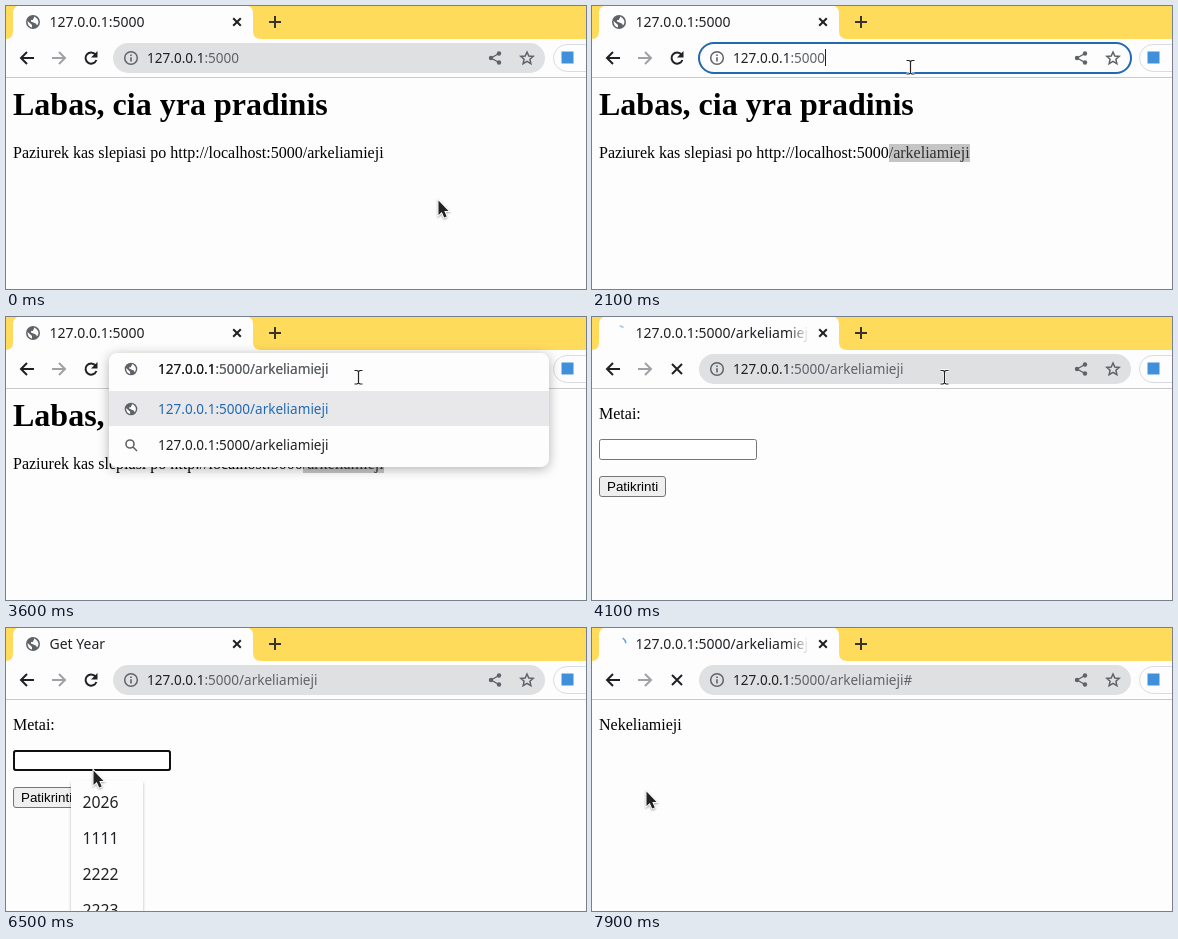
Recreate the animation shown at these times as an HTML page with a canvas. Size 580 by 283 pixels, loop 8 s.

```html
<!DOCTYPE html>
<html lang="lt">
<head>
<meta charset="utf-8">
<style>
  html, body { margin: 0; width: 100%; height: 100%; overflow: hidden; background: #fefdfe; }
  canvas { display: block; width: 580px; height: 283px; }
</style>
</head>
<body>
<canvas id="stage" width="580" height="283"></canvas>
<script>
const g = document.getElementById('stage').getContext('2d');
const LOOP = 8000, STEP = 100;
const PAPER = '#fefdfe', INK = '#202124', GREY = '#5f6368', BLUE = '#3390fa';
const UI = '"Noto Sans", "Open Sans", sans-serif';
const SERIF = '"Liberation Serif", serif';
const SANS = '"Liberation Sans", sans-serif';
const HOST = '127.0.0.1', PORT = ':5000', PATH = '/arkeliamieji';

// Pointer path: time, x, y
const pointer = [
  [0, 432, 194], [100, 432, 194], [400, 298, 164], [500, 298, 164], [900, 296, 143], [1000, 296, 143],
  [1100, 396, 160], [1200, 341, 155], [1400, 190, 62], [1500, 143, 30], [1600, 175, 10],
  [1700, 245, 24], [1900, 318, 61], [2200, 318, 61], [2400, 526, 61], [2700, 526, 61],
  [2900, 352, 60], [4600, 352, 60], [4800, 180, 160], [4900, 50, 241], [5000, 2, 235],
  [5100, 88, 198], [5200, 88, 198], [5500, 62, 144], [5600, 62, 144], [5900, 87, 136],
  [6400, 87, 136], [6500, 87, 142], [6600, 87, 142], [6700, 92, 172], [7300, 92, 172],
  [7700, 54, 163], [8000, 54, 163]
];
const beamTimes = [[700, 1100], [1900, 4700], [5700, 6500]];
const during = (t, a, b) => t >= a && t < b;

function text(s, x, y, size, family, color = '#000', weight = '') {
  g.font = `${weight} ${size}px ${family}`;
  g.fillStyle = color;
  g.fillText(s, x, y);
  return x + g.measureText(s).width;
}

function box(x, y, w, h, r, fill, stroke, width = 1) {
  g.beginPath();
  g.roundRect(x, y, w, h, r);
  if (fill) { g.fillStyle = fill; g.fill(); }
  if (stroke) { g.strokeStyle = stroke; g.lineWidth = width; g.stroke(); }
}

function shadowBox(x, y, w, h, r, blur) {
  g.save();
  g.shadowColor = 'rgba(0,0,0,.3)';
  g.shadowBlur = blur;
  g.shadowOffsetY = 2;
  box(x, y, w, h, r, PAPER);
  g.restore();
}

function stroke(d, color = INK, width = 2, x = 0, y = 0) {
  g.save();
  g.translate(x, y);
  g.strokeStyle = color;
  g.lineWidth = width;
  g.stroke(new Path2D(d));
  g.restore();
}

function fill(d, color, x = 0, y = 0) {
  g.save();
  g.translate(x, y);
  g.fillStyle = color;
  g.fill(new Path2D(d));
  g.restore();
}

function disc(x, y, r, color) {
  g.beginPath();
  g.arc(x, y, r, 0, Math.PI * 2);
  g.fillStyle = color;
  g.fill();
}

function globe(x, y, r) {
  disc(x, y, r, GREY);
  g.save();
  g.translate(x, y);
  g.scale(r / 7, r / 7);
  fill('M-5.5-1 L-1 3 V5.6 Q-5.5 4.5 -5.5-1 M1-5.5 Q5 -4 5.5 0 Q5 3 4 3.5 Q3.5 1 1.5 1 L-2-.5 V-2 H0 V-3.5 H1Z', PAPER);
  g.restore();
}

function cross(x, y, r) {
  stroke(`M${-r} ${-r} L${r} ${r} M${r} ${-r} L${-r} ${r}`, INK, 2, x, y);
}

function spinner(t) {
  const age = t < 5000 ? Math.min(t - 4000, 200) : t - 7750;
  const from = (-100 + age * .15) * Math.PI / 180;
  const sweep = (age * .3 + 5) * Math.PI / 180;
  const turn = t > 5000 ? .35 : 0;
  g.beginPath();
  g.arc(27, 16, 7, from + turn, from + turn + sweep);
  g.strokeStyle = t > 5000 ? '#62a5e4' : '#a5c5e8';
  g.lineWidth = 1.7;
  g.stroke();
}

function tabStrip(t, loading) {
  g.fillStyle = '#ffdb5c';
  g.fillRect(0, 0, 580, 33);
  fill('M0 33 Q7 33 7 25 V7 Q7 0 15 -1 H239 Q247 0 247 7 V25 Q247 33 255 33Z', PAPER);
  if (loading) spinner(t); else globe(27, 16, 7);

  const address = HOST + PORT;
  const title = loading ? address + PATH : t < 4500 ? address : 'Get Year';
  g.save();
  g.beginPath();
  g.rect(40, 0, 177, 33);
  g.clip();
  text(title, 43.5, 21, 14, UI, INK);
  const fade = g.createLinearGradient(196, 0, 217, 0);
  fade.addColorStop(0, 'rgba(254,253,254,0)');
  fade.addColorStop(1, PAPER);
  g.fillStyle = fade;
  g.fillRect(196, 3, 22, 28);
  g.restore();
  cross(231, 16, 3.8);
  stroke('M-6 0 H6 M0 -6 V6', '#38342a', 2, 269, 16);
}

function urlText(x, path, selected) {
  let end = text(HOST, x, 57, 13.55, UI, selected ? '#fff' : INK);
  return text(PORT + path, end, 57, 13.55, UI, selected ? '#fff' : GREY);
}

function toolbar(t, loading) {
  g.fillStyle = PAPER;
  g.fillRect(0, 33, 580, 38);
  g.fillStyle = '#cacacc';
  g.fillRect(0, 71, 580, 1);
  const arrow = 'M7 0 H-6 M0 -6 L-6 0 L0 6';
  stroke(arrow, INK, 2, 21, 52);
  stroke('M-7 0 H6 M0 -6 L6 0 L0 6', '#a0a1a4', 2, 53, 52);
  if (loading) cross(85, 52, 5);
  else {
    stroke('M4.5 -3.5 A5.6 5.6 0 1 0 5.4 2', INK, 2, 85, 52);
    fill('M6.5 -7 V-.5 H0Z', INK, 85, 52);
  }
  box(547.5, 38.5, 50, 27, 13.5, PAPER, '#d9dce2');
  box(555.5, 45.5, 12, 12, 0, '#3f8fda');

  const focused = during(t, 2000, 3100), editing = during(t, 3100, 4000);
  if (editing) return suggestions(t);

  if (focused) box(107, 37, 432, 30, 15, PAPER, '#2269b3', 2);
  else box(107, 37, 432, 30, 15, '#dee0e2');
  g.beginPath();
  g.arc(125, 52, 6.3, 0, Math.PI * 2);
  g.strokeStyle = GREY;
  g.lineWidth = 1.5;
  g.stroke();
  stroke('M0 -.7 V3.6 M0 -3.6 V-2', GREY, 1.6, 125, 52);

  stroke('M4 -4.5 L-4 0 L4 4.5', GREY, 1.4, 489, 52);
  for (const [x, y] of [[493, 47.5], [485, 52], [493, 56.5]]) disc(x, y, 2.2, GREY);
  stroke('M0 -6 L1.8 -2 L6.2 -1.6 L2.9 1.3 L3.9 5.6 L0 3.3 L-3.9 5.6 L-2.9 1.3 L-6.2 -1.6 L-1.8 -2Z',
    GREY, 1.5, 521, 52);

  const selected = during(t, 2000, 2100) || during(t, 2300, 2600);
  if (selected) {
    g.fillStyle = BLUE;
    g.fillRect(141, 43, 93, 18);
  }
  const path = t < 4000 ? '' : t < 7800 ? PATH : PATH + '#';
  const end = urlText(141, path, selected);
  if (focused && !selected) {
    g.fillStyle = INK;
    g.fillRect(Math.round(end), 43, 1, 17);
  }
}

function suggestions(t) {
  const open = t >= 3200;
  if (open) {
    shadowBox(103, 36, 440, 114, 8, 12);
    g.fillStyle = '#e8e8ea';
    g.fillRect(103, 74, 440, 35);
    globe(125, 92, 6.3);
    urlText(152, PATH);
    text(HOST + PORT + PATH, 152, 97, 13.55, UI, '#2269b3');
    stroke('M2 2 L6 6 M3 -1 A4 4 0 1 1 -5 -1 A4 4 0 1 1 3 -1', GREY, 1.6, 125, 128);
    text(HOST + PORT + PATH, 152, 133, 13.55, UI, INK);
  }
  globe(125, 52, 6.3);
  const end = urlText(152, PATH);
  if (t < 3600) {
    g.fillStyle = INK;
    g.fillRect(Math.round(end), 43, 1, 17);
  }
}

function homePage(t) {
  text('Labas, cia yra pradinis', 7, 109, 32, SERIF, '#000', 'bold');
  const end = text('Paziurek kas slepiasi po http://localhost:5000', 7, 152, 16, SERIF);
  if (t >= 1100) {
    g.fillStyle = t < 2000 ? BLUE : '#c5c5c5';
    g.fillRect(297, 138, 81, 18);
  }
  text(PATH, end, 152, 16, SERIF, during(t, 1100, 2000) ? '#fff' : t < 1100 ? '#000' : '#303030');
}

function formPage(t) {
  const focus = during(t, 5800, 7700), filled = t >= 6700;
  text('Metai:', 7, 102, 16, SERIF);
  box(7.5, 122.5, 157, 20, 2, filled ? '#e8f0fe' : '#fff', '#767676');
  if (focus) box(8, 123, 156, 19, 2, null, '#101010', 2);
  let end = 11;
  if (filled) end = text('2026', 11, 137, 13.33, SANS);
  if (during(t, 5800, 6500) || during(t, 7100, 7700)) {
    g.fillStyle = '#000';
    g.fillRect(Math.floor(end), 125, 1, 15);
  }
  const hover = during(t, 5400, 5500) || t >= 7500;
  box(7.5, 159.5, 66, 20, 2.5, hover ? '#e5e5e5' : '#efefef', '#767676');
  if (t >= 7700) box(7, 159, 67, 21, 3, null, '#101010', 2);
  text('Patikrinti', 15, 174, 13.33, SANS);

  if (during(t, 5900, 7100)) {
    shadowBox(65, 152, 72, 150, 3, 3);
    if (filled) {
      g.fillStyle = '#e6e6e8';
      g.fillRect(65, 156, 72, 36);
    }
    ['2026', '1111', '2222', '2223'].forEach((year, i) =>
      text(year, 76.5, 180 + 36 * i, 15.8, UI, INK));
  }
}

function drawPointer(t) {
  const i = Math.max(1, pointer.findIndex(p => p[0] >= t));
  const [t0, x0, y0] = pointer[i - 1], [t1, x1, y1] = pointer[i];
  const k = (t - t0) / (t1 - t0);
  const x = Math.round(x0 + (x1 - x0) * k), y = Math.round(y0 + (y1 - y0) * k);
  if (beamTimes.some(([a, b]) => during(t, a, b))) {
    const beam = 'M-3.5 -6.5 H-1 L.5 -5.5 L2 -6.5 H4.5 M.5 -6 V6.5 M-3.5 7 H-1 L.5 6 L2 7 H4.5';
    stroke(beam, '#fff', 3, x, y);
    stroke(beam, '#222', 1.2, x, y);
  } else {
    const arrow = 'M.5 .5 V15 L3.8 12 L6.2 17.5 L8.7 16.4 L6.3 11 H10.5Z';
    g.save();
    g.shadowColor = 'rgba(0,0,0,.35)';
    g.shadowBlur = 2;
    g.shadowOffsetY = 1;
    stroke(arrow, '#fff', 2, x, y);
    g.restore();
    fill(arrow, '#222', x, y);
  }
}

function draw(now) {
  const t = Math.floor(now % LOOP / STEP) * STEP;
  const loading = during(t, 4000, 4500) || t >= 7800;
  g.fillStyle = PAPER;
  g.fillRect(0, 0, 580, 283);
  if (t < 4100) homePage(t);
  else if (t < 7800) formPage(t);
  else text('Nekeliamieji', 7, 102, 16, SERIF);
  tabStrip(t, loading);
  toolbar(t, loading);
  drawPointer(t);
}

const start = performance.now();
function frame() {
  draw(performance.now() - start);
  requestAnimationFrame(frame);
}
frame();
</script>
</body>
</html>
```
